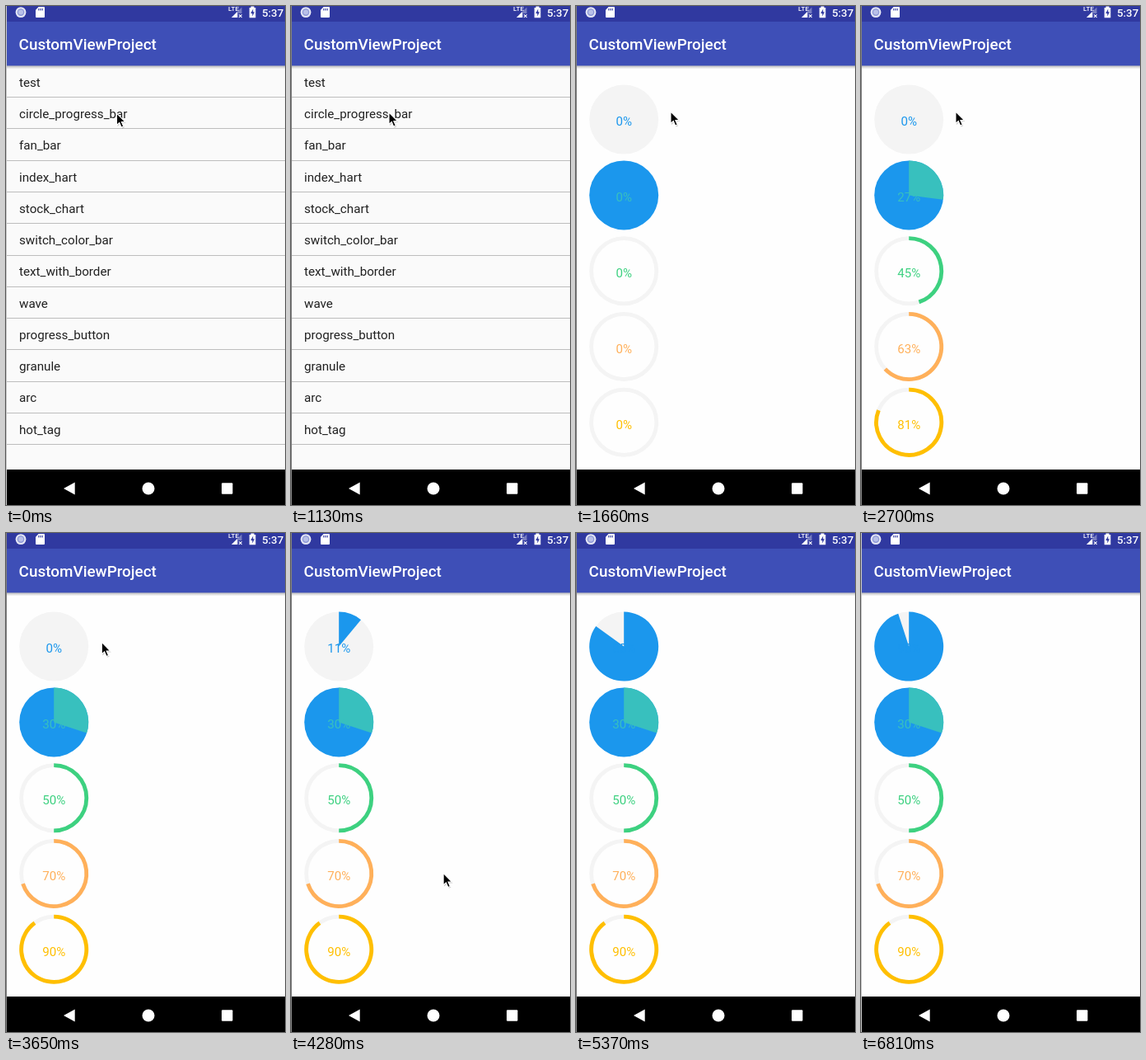
These frames come from a looping animation (339 px wide and 605 px high, 6.91 s). An HTML page:

```html
<!DOCTYPE html>
<html lang="en">
<head>
<meta charset="utf-8">
<title>CustomViewProject</title>
<style>
  html, body { margin: 0; width: 100%; height: 100%; overflow: hidden; background: #fff; }
  svg { display: block; font-family: Roboto, sans-serif; }
  .title { font-size: 18.9px; font-weight: 500; fill: #fff; }
  .row { font-size: 15.2px; fill: #212121; }
  .pct { font-size: 15.1px; text-anchor: middle; }
</style>
</head>
<body>
<svg id="stage" width="339" height="605" viewBox="0 0 339 605">
  <defs>
    <linearGradient id="shade" x2="0" y2="1">
      <stop stop-color="#000" stop-opacity=".28"/>
      <stop offset="1" stop-color="#000" stop-opacity="0"/>
    </linearGradient>
    <g id="bar">
      <rect y="72" width="339" height="4.5" fill="url(#shade)"/>
      <rect width="339" height="19" fill="#3039a0"/>
      <rect y="19" width="339" height="53.4" fill="#3e4fb7"/>
      <text class="title" x="15.6" y="53">CustomViewProject</text>
    </g>
  </defs>
  <rect y="562" width="339" height="43"/>
  <g id="menu">
    <rect width="339" height="562" fill="#fafafa"/>
    <use href="#bar"/>
  </g>
  <g id="page">
    <rect width="339" height="562" fill="#fefefe"/>
    <use href="#bar"/>
  </g>
  <g id="status" fill="#fff">
    <circle cx="18" cy="7.6" r="6.4" fill="#e4e6f5"/>
    <circle cx="18" cy="7.6" r="4.3" fill="#8d98d6"/>
    <circle cx="18" cy="7.6" r="3" fill="#b9c0e8"/>
    <path d="M39.7 1H46q1 0 1 1V13q0 1-1 1H37q-1 0-1-1V4.800z"/>
    <path d="M39.800 3v2.600M42 3v2.600M44.200 3v2.600" stroke="#3039a0" stroke-width="1.100"/>
    <text x="270" y="6.300" font-size="8" font-weight="500">LTE</text>
    <path d="M274 14L286.500 1.500V9H282V14z" fill-opacity=".35"/>
    <path d="M274 14L281 7V14z"/>
    <path d="M283 10.300l3.600 3.600m0-3.600l-3.600 3.600" stroke="#fff" stroke-width="1.100"/>
    <path d="M297.500 0.500h4V2h1.800V14.300h-7.600V2h1.800z"/>
    <path d="M300.200 3.600L297.300 9h2v3.600L302 7.300h-1.800z" fill="#3039a0"/>
    <text x="311" y="13" font-size="13.3" font-weight="500">5:37</text>
  </g>
  <g fill="#fff">
    <path d="M70 585L83.700 577.500V592.500z"/>
    <circle cx="173" cy="585" r="7.500"/>
    <rect x="262" y="578.300" width="13.400" height="13.400" rx="1"/>
  </g>
  <rect id="edge" width="1" height="605"/>
  <g id="cursor">
    <path d="M1 1.500V16l3.300-3 2.400 5.400 2.600-1.100-2.400-5.300h4.600z" opacity=".2"/>
    <path d="M0 0V14.500l3.300-3 2.400 5.600 2.600-1.100-2.400-5.400h4.600z" stroke="#fff" stroke-width="1.100"/>
  </g>
</svg>
<script>
const LOOP = 6910, STEP = 57.2;
const $ = id => document.getElementById(id);

function add(parent, tag, attrs, text) {
  const el = document.createElementNS('http://www.w3.org/2000/svg', tag);
  for (const k in attrs) el.setAttribute(k, attrs[k]);
  if (text) el.textContent = text;
  parent.appendChild(el);
  return el;
}

['test', 'circle_progress_bar', 'fan_bar', 'index_hart', 'stock_chart', 'switch_color_bar',
 'text_with_border', 'wave', 'progress_button', 'granule', 'arc', 'hot_tag'].forEach((name, i) => {
  const y = i * 38.27;
  add($('menu'), 'text', { class: 'row', x: 16, y: 97.7 + y }, name);
  add($('menu'), 'rect', { x: 0, y: Math.round(110.2 + y), width: 339, height: 1, fill: '#bdbdbd' });
});

// Each dial: final percent, track colour, progress colour, filled or ring
const CX = 58.2, R = 42, RING = 4.8;
const dials = [
  [95, '#f4f4f4', '#1b97ed', true],
  [30, '#1b97ed', '#38c0be', true],
  [50, '#f4f4f4', '#3dd180', false],
  [70, '#f4f4f4', '#ffb05a', false],
  [90, '#f4f4f4', '#ffbf00', false]
].map(([max, track, color, solid], i) => {
  const cy = 137.6 + i * 91.8, r = solid ? R : R - RING / 2;
  const paint = c => solid ? { fill: c } : { fill: 'none', stroke: c, 'stroke-width': RING };
  add($('page'), 'circle', { cx: CX, cy, r, ...paint(track) });
  const arc = add($('page'), 'path', paint(color));
  const label = add($('page'), 'text', { class: 'pct', x: CX, y: cy + 7.7, fill: color });
  return { max, cy, r, solid, arc, label };
});

function setDial(d, k) {
  const p = Math.floor(d.max * k + 1e-6), a = p / 50 * Math.PI;
  const x = CX + d.r * Math.sin(a), y = d.cy - d.r * Math.cos(a);
  const curve = `M${CX} ${d.cy - d.r}A${d.r} ${d.r} 0 ${p > 50 ? 1 : 0} 1 ${x} ${y}`;
  d.arc.setAttribute('d', p ? curve + (d.solid ? `L${CX} ${d.cy}z` : '') : '');
  d.label.textContent = p + '%';
}

const clamp = v => Math.min(1, Math.max(0, v));
const ease = v => (1 - Math.cos(Math.PI * clamp(v))) / 2;
const snap = (t, from, step) => from + Math.floor((t - from) / step) * step;

// Pointer path: time, x, y
const path = [[3593, 115, 128], [3900, 122, 152], [4160, 150, 270], [4279, 185, 412],
  [4336, 216, 546], [4394, 234, 603], [4451, 250, 660]];

function pointer(t) {
  if (t < 1130) return [134.5, 130];
  if (t < 1190) return [119, 129];
  if (t < 3650) return [115, 128];
  const s = snap(t, 3650, STEP);
  const i = path.findIndex(p => p[0] > s);
  if (i < 0) return [250, 660];
  const a = path[i - 1], b = path[i], k = (s - a[0]) / (b[0] - a[0]);
  return [a[1] + (b[1] - a[1]) * k, a[2] + (b[2] - a[2]) * k];
}

function draw(t) {
  // Window opens: quartic fade, quintic slide
  const s = snap(t, 1480, 60) - 1429;
  const open = t >= 1480;
  const fade = open ? 1 - (1 - clamp(s / 200)) ** 4 : 0;
  const slide = open ? Math.round(48.4 * (1 - clamp(s / 350)) ** 5) : 48;
  $('page').setAttribute('opacity', fade);
  $('page').setAttribute('transform', `translate(0 ${slide})`);

  const rest = t < 2020 ? 0 : ease((snap(t, 2020, 56.6) - 1898) / 1000);
  const first = t < 3650 ? 0 : ease((snap(t, 3650, STEP) - 3850) / 1916);
  dials.forEach((d, i) => setDial(d, i ? rest : first));

  const [x, y] = pointer(t);
  $('cursor').setAttribute('transform', `translate(${x} ${y})`);
  $('edge').setAttribute('fill', t < 410 || t >= 6810 ? '#c8c8c8' : '#808080');
}

const start = performance.now();
function tick() {
  draw((performance.now() - start) % LOOP);
  requestAnimationFrame(tick);
}
tick();
</script>
</body>
</html>
```
